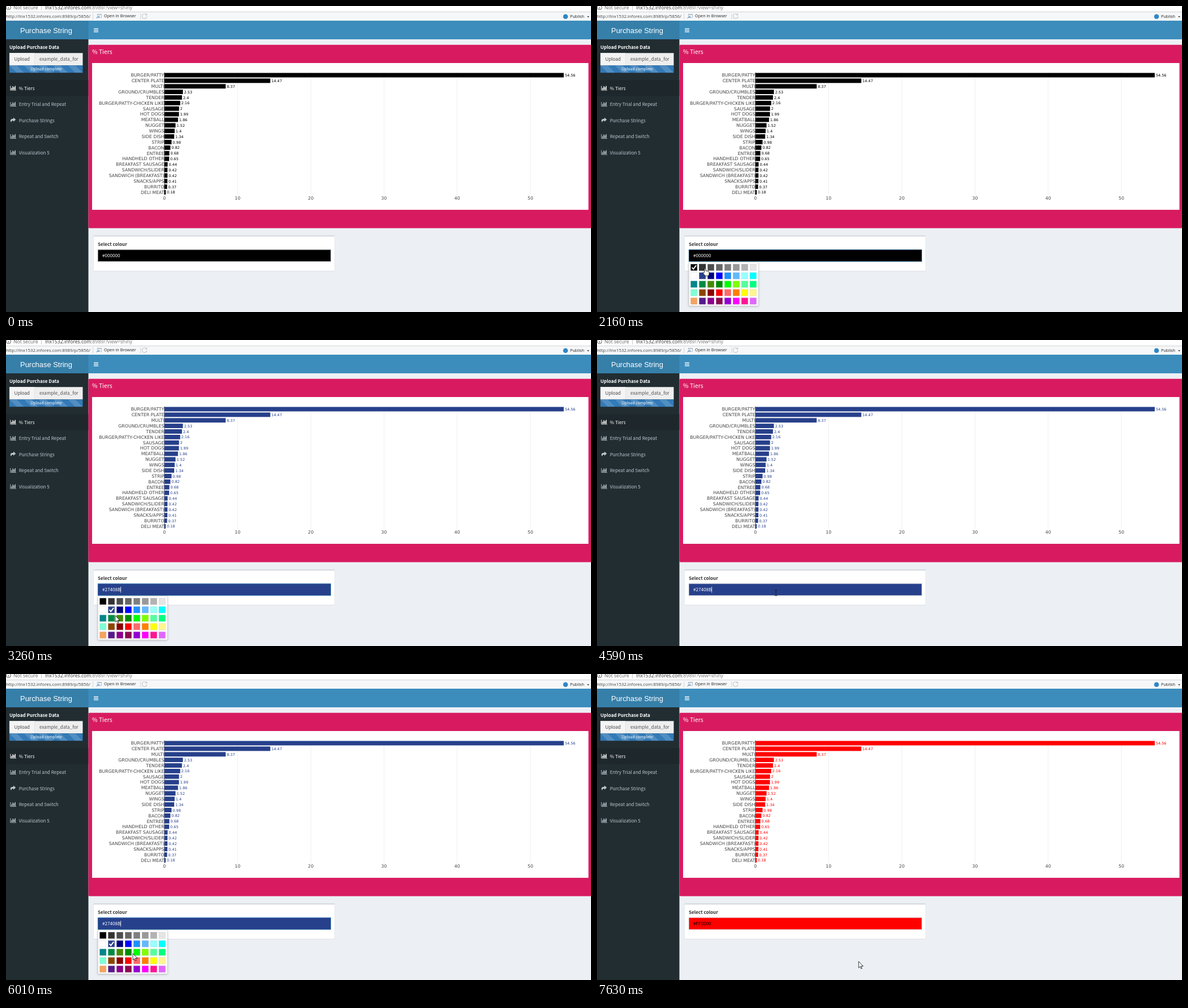
These frames come from a looping animation (1033 by 542 pixels, 8 s). An HTML page with a canvas:

```html
<!DOCTYPE html>
<html lang="en">
<head>
<meta charset="utf-8">
<title>Purchase String</title>
<style>
html, body { margin: 0; width: 100%; height: 100%; overflow: hidden; background: #ecf0f5; }
canvas { display: block; }
</style>
</head>
<body>
<canvas id="stage" width="1033" height="542"></canvas>
<script>
const ctx = document.getElementById('stage').getContext('2d');
const LOOP = 8000, FIRST = 190, TICK = 78.5;
const UI = '"Noto Sans CJK JP", "Noto Sans CJK SC", "Noto Sans CJK", "Open Sans", sans-serif';
const CHROME = '"Open Sans", "Noto Sans", sans-serif';
const PLOT = '"DejaVu Sans", sans-serif';
const BODY = 8.1;

const tiers = [
  ['BURGER/PATTY', 54.56], ['CENTER PLATE', 14.47], ['MULTI', 8.37], ['GROUND/CRUMBLES', 2.53],
  ['TENDER', 2.4], ['BURGER/PATTY-CHICKEN LIKE', 2.16], ['SAUSAGE', 2], ['HOT DOGS', 1.99],
  ['MEATBALL', 1.86], ['NUGGET', 1.52], ['WINGS', 1.4], ['SIDE DISH', 1.34], ['STRIP', 0.98],
  ['BACON', 0.82], ['ENTREE', 0.68], ['HANDHELD OTHER', 0.65], ['BREAKFAST SAUSAGE', 0.44],
  ['SANDWICH/SLIDER', 0.42], ['SANDWICH (BREAKFAST)', 0.42], ['SNACKS/APPS', 0.41],
  ['BURRITO', 0.37], ['DELI MEAT', 0.18]
];
const swatches = (
  '000000 333333 4D4D4D 666666 7F7F7F 999999 B3B3B3 E5E5E5 ' +
  'FFFFFF 27408B 000080 0000FF 1E90FF 63B8FF 97FFFF 00FFFF ' +
  '00868B 008B45 458B00 008B00 00FF00 7FFF00 54FF9F 00FF7F ' +
  '7FFFD4 8B4500 8B0000 FF0000 FF6A6A FF7F00 FFFF00 FFF68F ' +
  'F4A460 551A8B 8B008B 8B0A50 9400D3 FF00FF FF1493 E066FF').split(' ').map(c => '#' + c);
const BLACK = swatches[0], BLUE = swatches[9], RED = swatches[27];
const GRID = { x: 165.3, y: 457, pitch: 14.93, size: 11.8 };

// Key poses: tick, then values
const pointer = [
  [0, 836, 530], [5, 662, 490], [8, 560, 455], [10, 520, 440], [11, 519, 439], [18, 519, 439],
  [19, 505, 443], [22, 300, 455], [24, 192, 463], [25, 191, 464], [29, 184, 479], [37, 186, 480],
  [39, 193, 488], [45, 335, 510], [47, 335, 509], [53, 316, 448], [58, 316, 448], [63, 249, 490],
  [66, 249, 490], [72, 223.5, 497], [74, 224, 495], [77, 215, 515], [78, 214, 516], [79, 214, 516],
  [83, 216, 508], [86, 216, 508], [88, 246, 509], [90, 345, 518], [93, 441, 511], [95, 462, 509]
];
const popupFade = [[13, 0], [16, 1], [46, 1], [49, 0], [56, 0], [59, 1], [91, 1], [94, 0]];
const caretResets = [14, 33, 56, 85];

const arrowShape = new Path2D('M0 0V11.5L2.6 9.1 4.4 13 6 12.3 4.3 8.5H8Z');
const handShape = new Path2D('M-1 1Q0-1 1 1V5L6 6Q7 6 7 8V11L6 14H0L-4 9Q-4 7-1.5 8Z');

function pose(keys, k) {
  if (k <= keys[0][0]) return keys[0].slice(1);
  const i = keys.findIndex(key => key[0] > k);
  if (i < 0) return keys[keys.length - 1].slice(1);
  const [a, b] = [keys[i - 1], keys[i]];
  const p = (k - a[0]) / (b[0] - a[0]);
  return a.slice(1).map((v, j) => v + (b[j + 1] - v) * p);
}

function rect(x, y, w, h, fill) {
  ctx.fillStyle = fill;
  ctx.fillRect(x, y, w, h);
}

function frame(x, y, w, h, color, width = 0.7) {
  ctx.strokeStyle = color;
  ctx.lineWidth = width;
  ctx.strokeRect(x, y, w, h);
}

function stroke(path, color, width) {
  ctx.strokeStyle = color;
  ctx.lineWidth = width;
  ctx.stroke(new Path2D(path));
}

// cy is the middle of the capitals
function text(str, x, cy, size, family, color, align = 'left', weight = 400) {
  ctx.font = `${weight} ${size}px ${family}`;
  ctx.fillStyle = color;
  ctx.textAlign = align;
  ctx.fillText(str, x, cy + size * 0.36);
}

function drawBrowser() {
  rect(0, 0, 1033, 26, '#fff');
  rect(0, 11, 1033, 15, '#f6f7f8');
  rect(0, 10, 1033, 1, '#d0d2d4');
  stroke('M8.5 2.5A4 4 0 1 1 .5 2.5A4 4 0 1 1 8.5 2.5M4.5 2V5', '#555', 1);
  text('Not secure', 13, 3, 8.65, CHROME, '#666');
  rect(62, 0, 0.8, 8, '#bbb');
  text('lnx1532.infores.com', 69, 3, 8.6, CHROME, '#333');
  const host = ctx.measureText('lnx1532.infores.com').width;
  text(':8989/?view=shiny', 69 + host, 3, 8.6, CHROME, '#777');
  text('http://lnx1532.infores.com:8989/p/5856/', 0, 18, 7.86, CHROME, '#444');
  rect(153, 13, 0.7, 11, '#ccc');
  frame(161.5, 14.5, 7, 6, '#9aa7b3');
  rect(161.5, 14.5, 7, 1.6, '#b9c8d6');
  stroke('M160 22Q160 19 164 19M163 17.5L165 19L163 20.7', '#5a9bd0', 1);
  text('Open in Browser', 173, 17.5, 7.28, CHROME, '#222');
  rect(237, 13, 0.7, 11, '#ccc');
  stroke('M248 15.5A4.3 4.3 0 1 0 248.8 18.5M248.5 13.5V16H246', '#c3c7ca', 1.2);
  ctx.fillStyle = '#2f87c8';
  ctx.beginPath();
  ctx.arc(988, 18.7, 4.3, 0, 7);
  ctx.fill();
  text('Publish', 996, 18, 7.3, CHROME, '#222');
  ctx.fillStyle = '#444';
  ctx.fill(new Path2D('M1026 18H1030L1028 20.5Z'));
}

function barIcon(x, y, color) {
  stroke(`M${x + .4} ${y}V${y + 7.6}H${x + 10.5}`, color, 0.9);
  [3, 6, 4.5, 6.5].forEach((h, i) => rect(x + 1.8 + i * 2.1, y + 6.6 - h, 1.4, h, color));
}

function drawSidebar() {
  rect(0, 59, 145.5, 483, '#222d32');
  text('Upload Purchase Data', 6, 73.5, BODY, UI, '#fff', 'left', 700);
  rect(6, 83.3, 129.5, 22, '#eee');
  rect(6, 83.3, 44.5, 22, '#f4f4f4');
  frame(6.3, 83.6, 44.2, 21.4, '#ddd');
  text('Upload', 28.3, 94.5, BODY, UI, '#444', 'center');
  text('example_data_for', 59, 94.5, BODY, UI, '#555');

  ctx.save();
  ctx.beginPath();
  ctx.rect(6, 105.3, 129.5, 12.9);
  ctx.clip();
  rect(6, 105, 130, 14, '#337ab7');
  ctx.fillStyle = 'rgba(255,255,255,.15)';
  for (let x = 6 - 25.86; x < 136; x += 25.86)
    ctx.fill(new Path2D(`M${x} 105.3h12.93l12.93 12.93h-12.93Z`));
  ctx.restore();
  text('Upload complete', 71, 111.7, 6.94, UI, '#fff', 'center');

  rect(0, 131.3, 145.5, 28.5, '#1e282c');
  ['% Tiers', 'Entry Trial and Repeat', 'Purchase Strings', 'Repeat and Switch', 'Visualization 5']
    .forEach((label, i) => {
      const y = 145.5 + i * 28.5, color = i ? '#b8c7ce' : '#fff';
      text(label, 22.7, y + 0.2, BODY, UI, color);
      if (i !== 2) return barIcon(7.5, y - 4, color);
      ctx.fillStyle = color;
      ctx.fill(new Path2D('M13 197.5L17.3 201.3L13 205V203Q9 202.6 9.2 206.5Q5 200 13 199.7Z'));
    });
}

function drawHeader() {
  rect(0, 26, 1033, 33, '#3c8dbc');
  rect(0, 26, 145.5, 33, '#367fa9');
  text('Purchase String', 71, 43, 12.93, '"Liberation Sans", sans-serif', '#fff', 'center');
  for (let i = 0; i < 3; i++) rect(155, 39.7 + i * 2.7, 8, 1.3, '#fff');
}

function drawChart(color) {
  ctx.fillStyle = '#d81b60';
  ctx.beginPath();
  ctx.roundRect(145.5, 68.7, 890, 324.8, 2);
  ctx.fill();
  text('% Tiers', 152, 81.5, 10.4, UI, '#fff');
  rect(152, 101, 876.5, 260, '#fff');
  const zero = 279.7, unit = 12.925;
  for (let v = 0; v <= 50; v += 10) {
    const x = zero + v * unit;
    rect(x - 0.35, 117.5, 0.7, 217.5, v ? '#e8e8e8' : '#444');
    text(v, x, 340.5, 7.76, PLOT, '#444', 'center');
  }
  tiers.forEach(([name, value], i) => {
    const y = 122.5 + i * 9.875;
    rect(zero, y - 3.95, value * unit, 7.9, color);
    text(name, 279.4, y, 7.85, PLOT, '#444', 'right');
    text(value, zero + value * unit + 2, y + 0.2, 6.47, PLOT, color);
  });
}

function drawField(color, focused, caret) {
  rect(154.5, 407, 426, 63, '#dde1e6');
  rect(155, 406.5, 425, 62.5, '#fff');
  rect(155, 406.3, 425, 2, '#d2d6de');
  text('Select colour', 162, 421.7, BODY, UI, '#333', 'left', 700);
  rect(162, 431.5, 411.7, 21.3, color);
  frame(162.2, 431.8, 411.3, 20.8, focused ? '#3c8dbc' : '#d2d6de');
  const ink = color === RED ? '#000' : '#fff';
  text(color, 170, 442.3, BODY, UI, ink);
  if (caret) rect(202.3, 437, 0.8, 10.5, ink);
}

function swatchAt([x, y]) {
  const col = Math.floor((x - GRID.x) / GRID.pitch), row = Math.floor((y - GRID.y) / GRID.pitch);
  const inside = col >= 0 && col < 8 && row >= 0 && row < 5 &&
    x - GRID.x - col * GRID.pitch <= GRID.size && y - GRID.y - row * GRID.pitch <= GRID.size;
  return inside ? row * 8 + col : -1;
}

function drawPopup(color, alpha, hover) {
  ctx.save();
  ctx.globalAlpha = alpha;
  ctx.shadowColor = 'rgba(0,0,0,.25)';
  ctx.shadowBlur = 4;
  ctx.shadowOffsetY = 1;
  rect(162.3, 454, 122.7, 77, '#fff');
  ctx.shadowColor = 'transparent';
  frame(162.3, 454, 122.7, 77, '#ccc', 0.6);
  swatches.forEach((fill, i) => {
    const x = GRID.x + (i % 8) * GRID.pitch, y = GRID.y + (i >> 3) * GRID.pitch;
    rect(x, y, GRID.size, GRID.size, fill);
    frame(x + 0.3, y + 0.3, GRID.size - 0.6, GRID.size - 0.6,
      i === hover ? '#444' : 'rgba(200,200,200,.5)', i === hover ? 1 : 0.6);
    if (fill === color)
      stroke(`M${x + 2.3} ${y + 6}l2.6 3l5-6.6`, color === RED ? '#000' : '#fff', 1.9);
  });
  ctx.restore();
}

function drawPointer([x, y], shape, color) {
  ctx.save();
  ctx.translate(x, y);
  if (shape === 'beam') {
    stroke('M-2.5-5H-.6L0-4.4L.6-5H2.5M0-4.4V4.4M-2.5 5H-.6L0 4.4L.6 5H2.5',
      color === BLACK ? '#ddd' : '#1a1a1a', 0.9);
  } else {
    const path = shape === 'hand' ? handShape : arrowShape;
    ctx.fillStyle = '#fff';
    ctx.fill(path);
    ctx.strokeStyle = '#000';
    ctx.lineWidth = 0.8;
    ctx.stroke(path);
  }
  ctx.restore();
}

function draw(now) {
  const t = now % LOOP;
  const k = Math.floor((t - FIRST + 14) / 78.4);
  const picked = k < 33 ? BLACK : k < 85 ? BLUE : RED;
  const plotted = k < 38 ? BLACK : k < 90 ? BLUE : RED;
  const [alpha] = pose(popupFade, k);
  const at = pose(pointer, k);
  const hover = alpha ? swatchAt(pose(pointer, k - 1)) : -1;
  const focused = (k >= 14 && k < 47) || (k >= 56 && k < 92);
  const reset = caretResets.filter(r => r <= k).pop();
  const caret = focused && Math.floor((k - reset) * TICK / 530) % 2 === 0;

  rect(0, 0, 1033, 542, '#ecf0f5');
  drawBrowser();
  drawHeader();
  drawSidebar();
  drawChart(plotted);
  drawField(picked, alpha > 0, caret);
  if (alpha) drawPopup(picked, alpha, hover);
  if (k >= 0) {
    const [x, y] = at;
    const overField = x > 162 && x < 573 && y > 431 && y < 453;
    const shape = overField ? 'beam' : hover >= 0 && swatchAt(at) === hover ? 'hand' : 'arrow';
    drawPointer(at, shape, picked);
  }
  requestAnimationFrame(draw);
}
requestAnimationFrame(draw);
</script>
</body>
</html>
```
